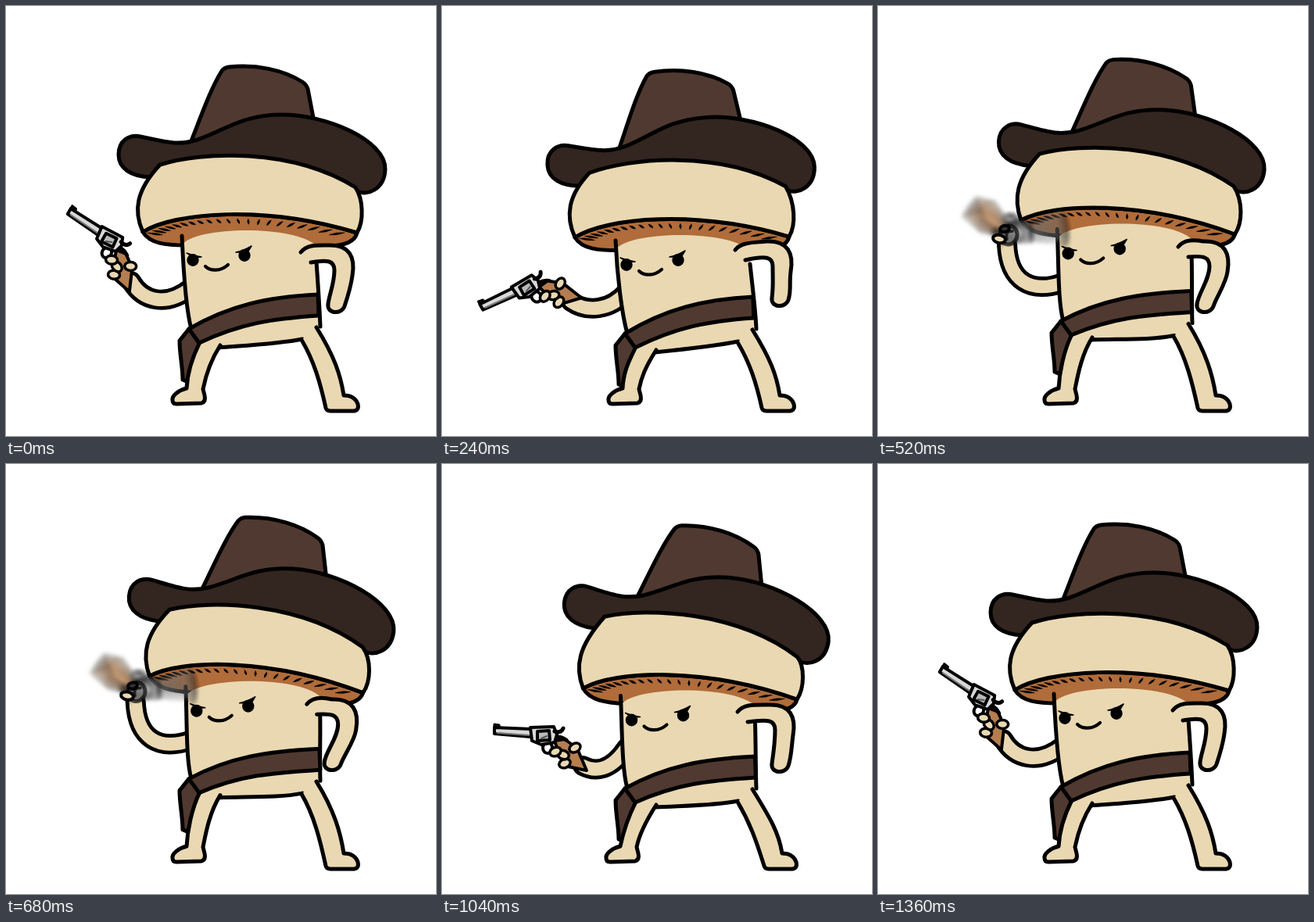
These frames come from a looping animation (550 by 550 pixels, 1.48 s). An HTML page with a canvas:

```html
<!DOCTYPE html>
<html lang="en">
<head>
<meta charset="utf-8">
<title>Mushroom gunslinger</title>
<style>
html, body { margin: 0; width: 100%; height: 100%; overflow: hidden; background: #fff; }
canvas { display: block; width: 100vw; height: 100vh; }
</style>
</head>
<body>
<canvas id="stage" width="550" height="550"></canvas>
<script>
const ctx = document.getElementById('stage').getContext('2d');
const LOOP = 1480, STEP = 40, LAST = 1360;
const SPIN_START = 320, SPIN_END = 920;
const CREAM = '#ead8b2', FELT = '#503930', BRIM = '#33251f', GILL = '#b06c3a', STEEL = '#d8d8d8', GRIP = '#b57e50';

// One row per key time; the final key repeats the first row.
const times = [0, 240, 360, 520, 840, 920, 1040, 1360];
const tracks = {
  hat: [[0, 0, 0], [-10, 5, -.047], [-.5, -3, -.01], [11, -8, .05], [16, -7, .092], [17, -6, .095], [13, 3, .09]],
  cap: [[0, 0, 0], [-5, 6, -.007], [2, -2, .004], [8, -6.5, .062], [8.5, -8, .08], [8.5, -7, .08], [5.5, 4.5, .048]],
  face: [[0, 0], [-3, 6], [1, -2], [4.2, -8.5], [5, -9.5], [5, -9], [3.5, 2.5]],
  hips: [[0, 0], [6, 3], [-3, -2.5], [-10, -4.5], [-10.5, -5], [-10, -5], [2, 5]],
  feet: [[0], [0], [0], [0], [0], [0], [3]],
  shoulder: [[0, 0], [-2, -3], [3, -4], [7, -7], [8, -8], [8, -8], [1, 2]],
  elbow: [[0, 0], [3, -5], [2, -4], [4, -5], [5, -5], [5, -5], [6, 2]],
  hand: [[0, 0], [10, -8], [1, -4], [-4, 0], [-5, 0], [-5, 0], [10, 2]],
  wrist: [[160, 352], [165, 378], [162, 310], [165, 305], [166, 304], [166, 306], [180, 386]],
  bend: [[175, 378, 205, 385], [185, 392, 215, 390], [165, 352, 195, 372], [167, 352, 195, 368],
    [168, 350, 195, 367], [168, 352, 195, 370], [195, 394, 215, 394]],
  gun: [[132, 300, .52], [109, 361, -.5], [167, 303, 2.3], [167, 293, 2.3], [167, 291, 2.3], [167, 293, 1.5], [130, 348, 0]]
};
for (const rows of Object.values(tracks)) rows.push(rows[0]);

// Monotone cubic easing through the keys, so extremes are never overshot.
function ease(rows, c, t) {
  let i = 0;
  while (i < times.length - 2 && t >= times[i + 1]) i++;
  const slope = k => (rows[k + 1][c] - rows[k][c]) / (times[k + 1] - times[k]);
  const tangent = k => {
    if (k === 0 || k === times.length - 1) return 0;
    const a = slope(k - 1), b = slope(k);
    return a * b <= 0 ? 0 : 2 * a * b / (a + b);
  };
  const h = times[i + 1] - times[i], u = (t - times[i]) / h, v = 1 - u;
  return rows[i][c] * v * v * (1 + 2 * u) + tangent(i) * h * u * v * v
    + rows[i + 1][c] * u * u * (3 - 2 * u) - tangent(i + 1) * h * u * u * v;
}

function poseAt(t) {
  const pose = {};
  for (const [name, rows] of Object.entries(tracks)) pose[name] = rows[0].map((_, c) => ease(rows, c, t));
  return pose;
}

const shift = ([dx, dy]) => (x, y) => [x + dx, y + dy];
const turn = ([dx, dy, r], cx, cy) => (x, y) => {
  const c = Math.cos(r), s = Math.sin(r);
  return [cx + dx + (x - cx) * c - (y - cy) * s, cy + dy + (x - cx) * s + (y - cy) * c];
};

// Each part is a list of points: one = line, two = quadratic, three = cubic.
function path(start, ...parts) {
  const p = new Path2D();
  p.moveTo(...start);
  for (const part of parts) p[[, 'lineTo', 'quadraticCurveTo', 'bezierCurveTo'][part.length]](...part.flat());
  return p;
}

function paint(p, fill, width = 5, color = '#000') {
  if (fill) { ctx.fillStyle = fill; ctx.fill(p); }
  if (width) { ctx.strokeStyle = color; ctx.lineWidth = width; ctx.stroke(p); }
}

function oval(x, y, rx, ry, angle, fill, width) {
  const p = new Path2D();
  p.ellipse(x, y, rx, ry, angle, 0, Math.PI * 2);
  paint(p, fill, width);
}

function drawHat(m) {
  paint(path(m(236, 175), [m(250, 140), m(262, 105), m(276, 83)], [m(279, 79), m(285, 78)],
    [m(320, 74), m(355, 82), m(379, 97)], [m(384, 100), m(386, 106)], [m(394, 148)]), FELT);
  const brim = path(m(144, 190), [m(144, 172), m(158, 164), m(172, 167)],
    [m(205, 174), m(220, 179), m(245, 171)], [m(280, 159), m(300, 140), m(350, 139)],
    [m(410, 138), m(486, 172), m(485, 209)], [m(484, 235), m(462, 243), m(449, 237)],
    [m(185, 219)], [m(160, 218), m(144, 208), m(144, 190)]);
  brim.closePath();
  paint(brim, BRIM);
}

const rim = [[175, 289], [215, 264], [330, 254], [449, 290]];
const bezier = (u, axis) => {
  const v = 1 - u, [a, b, c, d] = rim.map(p => p[axis]);
  return v * v * v * a + 3 * v * v * u * b + 3 * v * u * u * c + u * u * u * d;
};

function drawGills(m) {
  const [a, b, c, d] = rim.map(p => m(...p));
  paint(path(a, [b, c, d], [m(446, 304), m(425, 309), m(395, 307)], [m(230, 306)],
    [m(205, 306), m(184, 304), a]), GILL);
  const count = 22;
  for (let i = 1; i < count; i++) {
    const u = i / count, side = Math.abs(u * 2 - 1);
    const x = bezier(u, 0), y = bezier(u, 1) + 6 - side * 1.5;
    const angle = Math.atan2(307 - y, (312 - x) * .8);
    const len = 8 + 14 * side * side;
    const ex = x + Math.cos(angle) * len, ey = y + Math.sin(angle) * len * .8;
    const mx = (x + ex) / 2, my = (y + ey) / 2, w = 2.6;
    const nx = -Math.sin(angle) * w, ny = Math.cos(angle) * w;
    paint(path(m(x, y), [m(mx + nx, my + ny), m(ex, ey)], [m(mx - nx, my - ny), m(x, y)]), '#000', .6);
  }
}

function drawCap(hat, cap) {
  const [a, b, c, d] = rim.map(p => cap(...p));
  const shell = path(hat(197, 203), [hat(250, 186), hat(365, 181), hat(447, 232)],
    [cap(457, 247), cap(458, 275), d], [c, b, a], [cap(163, 262), cap(166, 236), hat(197, 203)]);
  shell.closePath();
  paint(shell, CREAM);
}

function drawTorso(p) {
  const f = shift(p.face), [l, r] = p.hips;
  const side = p.face[0];
  const left = [f(225, 294), [f(227, 340), [230, 388 + l], [237, 413 + l]]];
  const right = [[397 + side, 327 + r], [[399 + side * .7, 355 + r], [401, 385 + r], [402, 410 + r]]];
  paint(path(...left, [[250, 432 + l]], [[275, 437 + l]], [[378, 427 + r]], [[402, 410 + r]],
    [[397 + side, 307 + p.face[1]]], [f(372, 280), f(241, 281), f(225, 306)]), CREAM, 0);
  paint(path(...left));
  paint(path(...right));
  paint(path([272, 437 + l], [[310, 434 + l * .7 + r * .3], [350, 432 + r], [379, 426 + r]]));
}

function drawLegs(p) {
  const [l, r] = p.hips, s = p.feet[0];
  const holster = path([234, 413 + l], [[222, 428 + l]],
    [[222, 445 + l], [226, 462 + l], [226, 478 + l]], [[233, 481 + l]], [[249, 431 + l]]);
  holster.closePath();
  paint(holster, FELT);
  paint(path([248, 430 + l], [[237, 452 + l], [232, 470], [231 - s, 489]],
    [[222 - s, 491], [212 - s, 498], [213 - s, 504]], [[213 - s, 509], [218 - s, 509]],
    [[250 - s, 508]], [[256 - s, 506], [254 - s, 498]], [[252 - s, 490]],
    [[255 - s, 475], [260, 456 + l], [274, 434 + l]]), CREAM);
  paint(path([378, 427 + r], [[394, 454 + r], [402, 482], [409 + s, 514]],
    [[410 + s, 518], [415 + s, 518]], [[445 + s, 518]], [[452 + s, 517], [450 + s, 509]],
    [[447 + s, 501], [440 + s, 498], [432 + s, 498]],
    [[428 + s, 472], [420, 448 + r], [397, 411 + r]]), CREAM);
}

function drawBelt(p) {
  const [l, r] = p.hips, x = 399 + p.face[0] * .4;
  const belt = path([234, 413 + l], [[285, 383 + l * .6 + r * .4], [335, 372 + r], [x, 369 + r]],
    [[x + 1, 396 + r]], [[340, 400 + r], [300, 406 + l * .6 + r * .4], [247, 431 + l]]);
  belt.closePath();
  paint(belt, FELT);
}

function drawFace(m) {
  for (const [x, y] of [[239, 325], [305, 319]]) oval(...m(x, y), 7.7, 7.9, 0, '#000', 0);
  paint(path(m(231, 316), [m(241, 320), m(250, 321)], [m(239, 322), m(231, 316)]), '#000', 1.5);
  paint(path(m(294, 315), [m(304, 313), m(314, 307)], [m(309, 315)], [m(294, 315)]), '#000', 1.5);
  paint(path(m(255, 333), [m(261, 339), m(274, 340), m(284, 331)]), null, 4.2);
}

function drawNearArm(p) {
  const s = shift(p.shoulder), e = shift(p.elbow), h = shift(p.hand);
  paint(path(s(377, 315), [s(385, 305), s(398, 306), e(412, 306)],
    [e(440, 305), e(447, 322), e(443, 345)], [e(441, 360), h(437, 372), h(433, 384)],
    [h(429, 395), h(410, 394), h(412, 381)], [h(414, 367), e(420, 355), e(420, 338)],
    [e(420, 326), e(412, 324), s(390, 328)]), CREAM);
}

function drawFarArm(p) {
  const [ax, ay, bx, by] = p.bend;
  const arm = path(p.wrist, [[ax, ay], [bx, by], [236, 361 + p.face[1] * .8]]);
  paint(arm, null, 26);
  paint(arm, null, 16.5, CREAM);
}

function polygon(points, fill, width) {
  const p = path(points[0], ...points.slice(1).map(q => [q]));
  p.closePath();
  paint(p, fill, width);
}

// Revolver facing left, with its frame window at the local centre.
function drawGun() {
  polygon([[14, 6], [27, 4], [43, 16], [55, 44], [31, 39], [20, 24]], GRIP, 4);
  oval(5, 15, 6, 7, 0, null, 4);
  polygon([[-63, -15], [-57, -14], [-56, -10], [-63, -11]], '#222', 3);
  polygon([[-63, -11], [-16, -9], [-16, 1], [-63, -3]], STEEL, 4);
  paint(path([-59, -4], [[-18, -1]]), null, 2, '#777');
  polygon([[-17, -11], [13, -12], [17, -2], [14, 8], [-3, 11], [-15, 6]], STEEL, 4);
  polygon([[-8, -6], [7, -7], [8, 5], [-8, 6]], '#b9b9b9', 4);
  paint(path([-3, 3], [[4, 0]]), null, 2, '#555');
  paint(path([14, -6], [[22, -3], [25, -10]]), null, 5);
  paint(path([17, 1], [[23, 1], [29, 5]]), null, 5);
}

function drawHeldGun([x, y, angle]) {
  ctx.save();
  ctx.translate(x, y);
  ctx.rotate(angle);
  drawGun();
  for (const [fx, fy, tilt] of [[40, 15, -.5], [27, 35, -.4], [25, 24, .3], [15, 20, -.4]])
    oval(fx, fy, 7.5, 5.5, tilt, CREAM, 3.5);
  ctx.restore();
}

function drawSpinningGun([x, y], t) {
  const angle = Math.PI - .2 + (t - 360) / 160 * Math.PI * 2;
  ctx.save();
  ctx.translate(x, y);
  ctx.save();
  ctx.filter = 'blur(2.5px)';
  ctx.globalAlpha = .14;
  for (let i = -4; i <= 4; i++) {
    ctx.save();
    ctx.rotate(angle + i * .06);
    ctx.translate(-12, 3);
    drawGun();
    ctx.restore();
  }
  ctx.restore();
  ctx.globalAlpha = .65;
  oval(0, 0, 11, 12, .3, '#777', 5);
  ctx.globalAlpha = 1;
  paint(path([-2, 5], [[-5, -5], [5, -5]]), null, 3.5, '#222');
  oval(-12, 5, 8, 5, .2, CREAM, 4);
  oval(-5, -8, 6, 4, -.2, '#333', 4);
  ctx.restore();
}

function draw(now) {
  const t = Math.min(Math.floor(now % LOOP / STEP) * STEP, LAST);
  const p = poseAt(t);
  const hat = turn(p.hat, 315, 175), cap = turn(p.cap, 312, 285);
  ctx.fillStyle = '#fff';
  ctx.fillRect(0, 0, 550, 550);
  ctx.lineCap = ctx.lineJoin = 'round';
  drawFarArm(p);
  drawHat(hat);
  drawGills(cap);
  drawTorso(p);
  drawLegs(p);
  drawBelt(p);
  drawCap(hat, cap);
  drawFace(shift(p.face));
  drawNearArm(p);
  if (t >= SPIN_START && t <= SPIN_END) drawSpinningGun(p.gun, t);
  else drawHeldGun(p.gun);
}

const began = performance.now();
function tick() {
  draw(performance.now() - began);
  requestAnimationFrame(tick);
}
tick();
</script>
</body>
</html>
```
